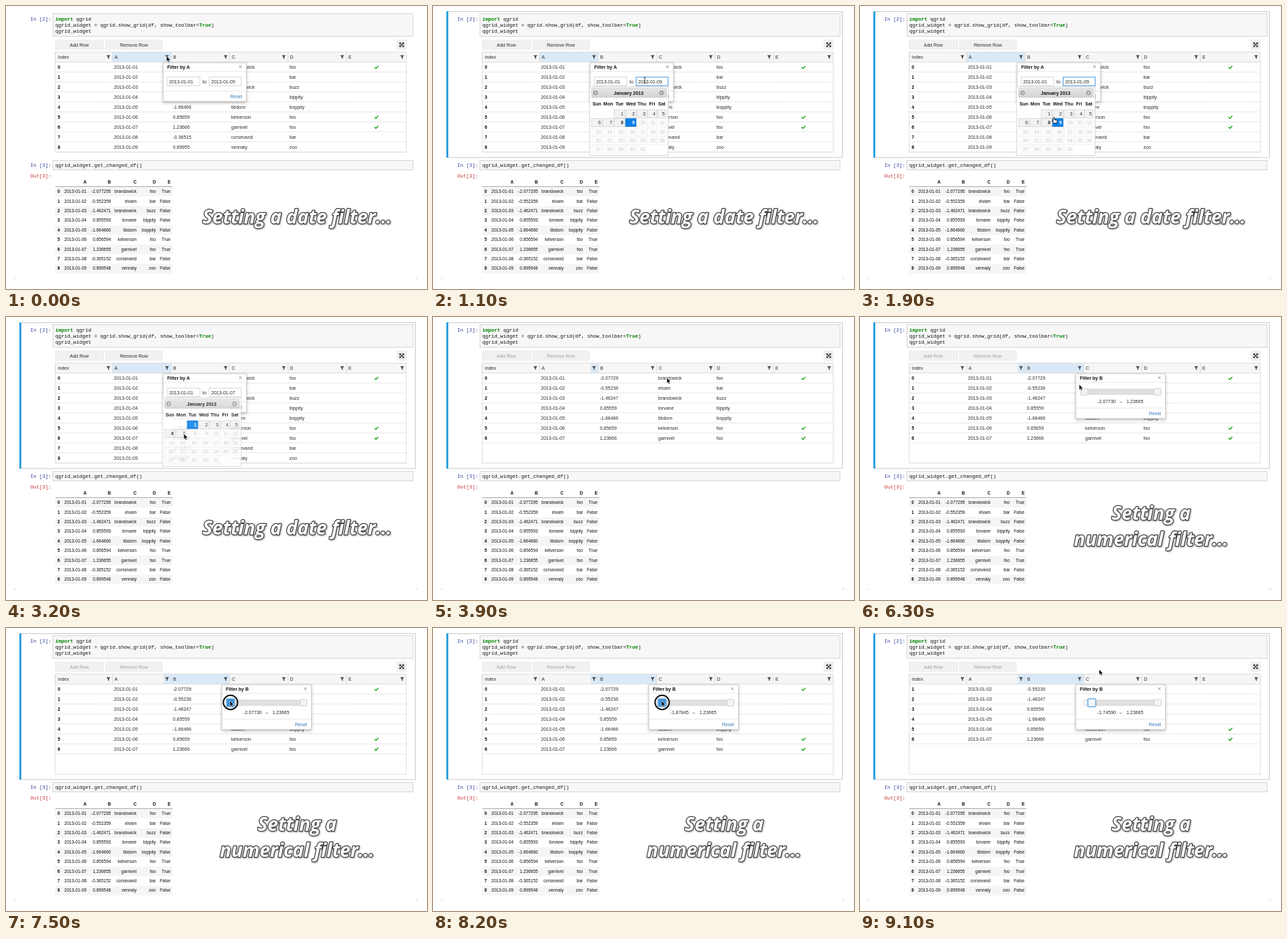
Animation of 632x424 px, one loop 9200 ms. Source, as an HTML page:

```html
<!DOCTYPE html>
<html lang="en">
<head>
<meta charset="utf-8">
<title>Grid filters</title>
<style>
html, body { margin: 0; width: 100%; height: 100%; overflow: hidden; background: #fff; }
svg { display: block; width: 632px; height: 424px; }
text { font: 7px "Liberation Sans", Arial, sans-serif; fill: #2b2b2b; white-space: pre; }
.b { font-weight: bold; fill: #111; }
.mono { font: 7.5px "Liberation Mono", "Courier New", monospace; fill: #111; }
.kw { font-weight: bold; fill: #008000; }
.in { fill: #303f9f; }
.res { fill: #c83232; }
.out text { font-size: 6.55px; fill: #111; }
.end { text-anchor: end; }
.mid { text-anchor: middle; }
.link { fill: #337ab7; }
.off { fill: #c4c4c4; }
.line { fill: none; stroke: #dcdcdc; }
.field { fill: #fff; stroke: #ccc; stroke-width: .8; }
.focus { fill: none; stroke: #66a9e6; stroke-width: 1.2; }
.pop { fill: #fff; stroke: #c4c4c4; stroke-width: .8; filter: drop-shadow(0 2px 2px rgba(0,0,0,.25)); }
.hl { fill: #d9e9f7; }
.cap { font: italic 700 28.2px "Open Sans", "Noto Sans", sans-serif; text-anchor: middle; fill: #fff;
  stroke: #3c3c3c; stroke-width: 2.4px; stroke-linejoin: round; paint-order: stroke;
  filter: drop-shadow(1.2px 1.2px .8px rgba(0,0,0,.35)); }

/* Things that come and go */
[class^="t-"] { animation: 9.2s step-end infinite; }
.t-sel, .t-pickTo, .t-pickFrom, .t-newDate, .t-mark, .t-popB, .t-hand, .t-beam, .t-ring,
.t-press, .t-focus, .t-val2, .t-val3, .t-cap2 { opacity: 0; }
.t-sel { animation-name: sel; }
.t-pickTo { animation-name: pickTo; }
.t-pickFrom { animation-name: pickFrom; animation-timing-function: linear; }
.t-oldDate { animation-name: oldDate; }
.t-newDate { animation-name: newDate; }
.t-late { animation-name: late; }
.t-low { animation-name: low; }
.t-rows { animation-name: rows; }
.t-dim text { animation: dim 9.2s step-end infinite; }
.t-popA { animation-name: popA; }
.t-mark { animation-name: mark; }
.t-popB { animation-name: popB; }
.t-arrow { animation-name: arrow; }
.t-beam { animation-name: beam; }
.t-hand { animation-name: hand; }
.t-ring { animation-name: ring; }
.t-press { animation-name: press; }
.t-focus { animation-name: focus; }
.t-val1 { animation-name: val1; }
.t-val2 { animation-name: val2; }
.t-val3 { animation-name: val3; }
.t-cap1 { animation-name: cap1; animation-timing-function: linear; }
.t-cap2 { animation-name: cap2; animation-timing-function: linear; }
.t-cursor { animation-name: cursor; animation-timing-function: ease-in-out; }
.t-slide { animation-name: slide; animation-timing-function: ease-in-out; }

@keyframes sel { 11.85%, to { opacity: 1; } }
@keyframes pickTo { 11.85% { opacity: 1; } 33.59% { opacity: 0; } }
@keyframes pickFrom { 0%, 33.58% { opacity: 0; } 33.59%, 34.5% { opacity: 1; } 36.85%, to { opacity: 0; } }
@keyframes oldDate { 33.59%, to { opacity: 0; } }
@keyframes newDate { 33.59%, to { opacity: 1; } }
@keyframes late { 36.85%, to { opacity: 0; } }
@keyframes low { 91.2%, to { opacity: 0; } }
@keyframes rows { 91.2%, to { transform: translateY(-14.95px); } }
@keyframes dim { 36.85%, to { fill: #a0a0a0; } }
@keyframes popA { 41.2%, to { opacity: 0; } }
@keyframes mark { 41.2%, to { opacity: 1; } }
@keyframes popB { 61.85%, to { opacity: 1; } }
@keyframes arrow { 7.5% { opacity: 0; } 33.59%, to { opacity: 1; } }
@keyframes beam { 7.5% { opacity: 1; } 15% { opacity: 0; } }
@keyframes hand { 15% { opacity: 1; } 33.59% { opacity: 0; } }
@keyframes ring { 79.2% { opacity: 1; } 95.5% { opacity: 0; } }
@keyframes press { 79.2% { opacity: 1; } 95.5% { opacity: 0; } }
@keyframes focus { 79.2%, to { opacity: 1; } }
@keyframes val1 { 89%, to { opacity: 0; } }
@keyframes val2 { 89% { opacity: 1; } 92.2% { opacity: 0; } }
@keyframes val3 { 92.2%, to { opacity: 1; } }
@keyframes cap1 { 0%, 36.9% { opacity: 1; } 40.2%, to { opacity: 0; } }
@keyframes cap2 { 0%, 42.9% { opacity: 0; } 46.2%, to { opacity: 1; } }
@keyframes cursor {
  0%, 1.09% { transform: translate(241px, 75px); }
  9.78%, 13.04% { transform: translate(318px, 111px); }
  19.57%, 22.83% { transform: translate(291px, 167px); }
  29.35%, 36.96% { transform: translate(267px, 175px); }
  40.76%, 43.48% { transform: translate(351px, 91px); }
  48.91%, 52.17% { transform: translate(306px, 73px); }
  54.35%, 65.22% { transform: translate(329px, 75px); }
  67.93%, 72.83% { transform: translate(329px, 101px); }
  77.17%, 83.59% { transform: translate(336px, 109px); }
  86.96%, 89.13% { transform: translate(343px, 109px); }
  93.48%, 98.8% { transform: translate(347px, 109px); }
  98.81%, to { transform: translate(359px, 62px); }
}
@keyframes slide {
  0%, 83.59% { transform: none; }
  86.96%, 89.13% { transform: translateX(7px); }
  93.48%, to { transform: translateX(11px); }
}
</style>
</head>
<body>
<svg viewBox="0 0 632 424">
  <defs>
    <clipPath id="body"><rect x="74" y="84" width="527" height="135"/></clipPath>
    <clipPath id="track"><rect x="336" y="108" width="111" height="8"/></clipPath>
    <linearGradient id="bar" x2="0" y2="1"><stop stop-color="#e6e6e6"/><stop offset="1" stop-color="#d2d2d2"/></linearGradient>
    <path id="funnel" d="M-2.9-2.8h5.8l-2.1 2.7v3.1l-1.6-1.2v-1.9z" fill="#444"/>
  </defs>
  <rect width="632" height="424" fill="#fff"/>
  <path d="M12.5 406v2.5h2M614 408.5h2.5V406" class="line"/>

  <g class="t-sel">
    <rect x="20.5" y="8.5" width="594" height="218.5" fill="#fff" stroke="#c8c8c8"/>
    <rect x="20" y="8" width="3" height="219" fill="#2e9fdc"/>
  </g>

  <g fill="#f7f7f7" stroke="#d4d4d4">
    <rect x="70.5" y="11.5" width="540.5" height="34"/>
    <rect x="70.5" y="231.5" width="540.5" height="14"/>
  </g>
  <text class="mono in end" x="68" y="21.5">In [2]:</text>
  <text class="mono" x="74" y="21.5"><tspan class="kw">import</tspan> qgrid</text>
  <text class="mono" x="74" y="31">qgrid_widget = qgrid.show_grid(df, show_toolbar=<tspan class="kw">True</tspan>)</text>
  <text class="mono" x="74" y="40">qgrid_widget</text>
  <text class="mono in end" x="68" y="241.2">In [3]:</text>
  <text class="mono" x="74" y="241.2">qgrid_widget.get_changed_df()</text>
  <text class="mono res end" x="68" y="256.5">Out[3]:</text>

  <g fill="#f1f1f1" stroke="#e4e4e4" stroke-width=".7">
    <rect x="74" y="51" width="72.5" height="14"/>
    <rect x="149.5" y="51" width="85" height="14"/>
    <rect x="587" y="51" width="14" height="14"/>
  </g>
  <g class="t-dim">
    <text class="mid" x="110" y="60.5">Add Row</text>
    <text class="mid" x="192" y="60.5">Remove Row</text>
  </g>
  <path transform="translate(594 58)" d="M-2.6-2.6l5.2 5.2M2.6-2.6l-5.2 5.2M-3-.8V-3h2.2M.8-3H3v2.2M3 .8V3H.8M-.8 3H-3V.8" fill="none" stroke="#333" stroke-width="1.1"/>

  <g id="head"></g>
  <g clip-path="url(#body)"><g id="rows" class="t-rows"></g></g>
  <rect class="line" x="74" y="69" width="527" height="150"/>
  <g id="result" class="out"></g>

  <g class="t-cap1"><text class="cap" x="437" y="326">Setting a date filter...</text></g>
  <g class="t-cap2">
    <text class="cap" x="437" y="304">Setting a</text>
    <text class="cap" x="437" y="342.5">numerical filter...</text>
  </g>

  <g class="t-popA">
    <rect class="pop" x="236" y="85" width="125" height="58"/>
    <path class="line" d="M236.5 98h124M236.5 127.5h124" stroke-width=".7"/>
    <text class="b" x="242" y="93.6">Filter by A</text>
    <text class="mid" x="352" y="94.3" style="fill:#888;font-size:9px">×</text>
    <rect class="field" x="242" y="106.5" width="49" height="13"/>
    <rect class="field" x="305" y="106.5" width="48" height="13"/>
    <text x="245" y="115.6">2013-01-01</text>
    <text class="mid" x="298" y="115.6">to</text>
    <g class="t-oldDate"><text x="308" y="115.6">2013-01-09</text></g>
    <g class="t-newDate"><text x="308" y="115.6">2013-01-07</text></g>
    <text class="link end" x="354.5" y="138.2">Reset</text>
    <g class="t-pickTo"><rect class="focus" x="305" y="106.5" width="48" height="13"/></g>
    <g id="to" class="t-pickTo"></g>
    <g id="from" class="t-pickFrom"></g>
  </g>

  <g class="t-popB">
    <rect class="pop" x="324" y="85" width="134.5" height="67"/>
    <path class="line" d="M324.5 98h133.5M324.5 136.5h133.5" stroke-width=".7"/>
    <text class="b" x="330" y="93.6">Filter by B</text>
    <text class="mid" x="449.5" y="94.3" style="fill:#888;font-size:9px">×</text>
    <g clip-path="url(#track)">
      <rect x="336" y="108" width="111" height="8" fill="#f8f8f8"/>
      <rect class="t-slide" x="336" y="108" width="120" height="8" fill="#e0e0e0"/>
    </g>
    <rect x="336" y="108" width="111" height="8" rx="1.5" fill="none" stroke="#cfcfcf" stroke-width=".8"/>
    <rect x="441.5" y="107" width="10.5" height="10" rx="1.5" fill="#f3f3f3" stroke="#c4c4c4" stroke-width=".8"/>
    <g class="t-slide">
      <rect x="331.5" y="107" width="10.5" height="10" rx="1.5" fill="#f3f3f3" stroke="#c4c4c4" stroke-width=".8"/>
      <g class="t-focus"><rect x="331" y="106" width="12" height="12" rx="1.5" fill="#eef4fa" stroke="#70aee2" stroke-width="1.6"/></g>
      <g class="t-press"><rect x="331.5" y="106.5" width="11" height="11" rx="1" fill="#3d94dd"/></g>
    </g>
    <g class="t-val1"><text class="end" x="384" y="128.5">-2.07730</text></g>
    <g class="t-val2"><text class="end" x="384" y="128.5">-1.87845</text></g>
    <g class="t-val3"><text class="end" x="384" y="128.5">-1.74590</text></g>
    <text class="mid" x="391.5" y="128.5">–</text>
    <text x="400" y="128.5">1.23665</text>
    <text class="link end" x="452" y="147.2">Reset</text>
  </g>

  <g class="t-cursor">
    <g class="t-ring"><circle cx="1" cy="2.5" r="10.7" fill="none" stroke="#111" stroke-width="2"/></g>
    <g class="t-arrow"><path d="M0 0v8.4l1.9-1.8 1.3 2.9 1.5-.7-1.3-2.8h2.6z" fill="#111" stroke="#fff" stroke-width=".5"/></g>
    <g class="t-beam"><path d="M-1.6-4h3.2M0-4v8M-1.6 4h3.2" fill="none" stroke="#222" stroke-width=".8"/></g>
    <g class="t-hand"><path d="M-1 .6q1-1.4 2 0v2.8l3.4.8q1 .4.8 1.5l-.7 2.9H0L-2.8 5q.2-1 1.8.4z" fill="#fff" stroke="#111" stroke-width=".9"/></g>
  </g>
</svg>
<script>
const $ = id => document.getElementById(id);
const text = (x, y, s, cls = '') => `<text x="${x}" y="${y}" class="${cls}">${s}</text>`;
const rect = (x, y, w, h, attrs) => `<rect x="${x}" y="${y}" width="${w}" height="${h}" ${attrs}/>`;
const funnel = x => `<use href="#funnel" x="${x}" y="76.5"/>`;

const names = 'brandowick elvam brandowick torvane tibdorn kelverson garnivel corsevand vennaly'.split(' ');
const words = 'foo bar buzz bippity boppity foo foo bar zoo'.split(' ');
const nums = '-2.077295 -0.552359 -1.462471 0.855593 -1.664660 0.856594 1.236655 -0.365152 0.899548'.split(' ');
const flags = [0, 5, 6];
const date = i => `2013-01-0${i + 1}`;

// Column heads
const cols = [74, 160, 248, 336, 423.3, 511, 601];
$('head').innerHTML = rect(74, 69, 527, 15, 'fill="#f6f6f6"') +
  `<g class="t-popA">${rect(160, 69, 88, 15, 'class="hl"')}</g>` +
  `<g class="t-mark">${rect(236.5, 69, 11.5, 15, 'class="hl"')}</g>` +
  `<g class="t-popB">${rect(248, 69, 88, 15, 'class="hl"')}</g>` +
  ['index', 'A', 'B', 'C', 'D', 'E'].map((s, i) =>
    text(cols[i] + (i ? 3 : 4), 79, s) + funnel(cols[i + 1] - 6.3) +
    `<path class="line" d="M${cols[i]} 69v15"/>`).join('') +
  '<path class="line" d="M74 84h527"/>';

// Grid rows
const step = 14.95;
$('rows').innerHTML = names.map((name, i) => {
  const y = 94.4 + i * step;
  const cls = i > 6 ? 't-late' : i ? '' : 't-low';
  const check = flags.includes(i)
    ? `<path d="M553.3 ${y - 2.7}l2 2 3.6-3.8" fill="none" stroke="#2cae2c" stroke-width="1.6"/>` : '';
  return `<g class="${cls}">` + text(77.5, y, i, 'b') + text(162, y, date(i)) +
    text(250.5, y, +(+nums[i]).toFixed(5)) + text(338, y, name) + text(425.5, y, words[i]) + check +
    `<path class="line" stroke-width=".7" d="M74 ${84 + (i + 1) * step}h527"/></g>`;
}).join('');

// Printed frame
const ends = [121, 157.5, 196, 225, 247];
$('result').innerHTML = [...'ABCDE'].map((s, i) => text(ends[i], 265.5, s, 'b end')).join('') +
  '<path d="M74 270.5h176" stroke="#999" stroke-width=".8"/>' +
  names.map((name, i) => {
    const y = 280.2 + i * 14.4;
    const cells = [date(i), nums[i], name, words[i], flags.includes(i) ? 'True' : 'False'];
    return (i % 2 ? '' : rect(74, y - 9.2, 176, 14.4, 'fill="#f5f5f5"')) +
      text(81, y, i, 'b end') + cells.map((s, k) => text(ends[k], y, s, 'end')).join('');
  }).join('');

// Month sheet: chosen day and last day allowed
const left = [238, 255, 272, 289, 306, 322, 337, 351];
function picker(chosen, last) {
  let s = rect(235, 121, 118, 103, 'fill="#fff" stroke="#c8c8c8" stroke-width=".8"') +
    rect(238, 123, 112.5, 14, 'rx="1.5" fill="url(#bar)" stroke="#c6c6c6" stroke-width=".6"');
  for (const [x, d] of [[244, 1], [343, -1]])
    s += `<circle cx="${x}" cy="130" r="3.5" fill="#a2a2a2"/><path d="M${x + d} 128.3l${-2 * d} 1.7 ${2 * d} 1.7" fill="#fff"/>`;
  s += text(293.7, 132.6, 'January 2013', 'b mid');
  'Sun Mon Tue Wed Thu Fri Sat'.split(' ').forEach((day, i) =>
    s += text((left[i] + left[i + 1] - 1) / 2, 148.6, day, 'b mid'));
  for (let d = 1; d <= 31; d++) {
    const col = (d + 1) % 7, y = 155.3 + Math.floor((d + 1) / 7) * 13.4;
    const x = left[col], w = left[col + 1] - x - 1;
    const on = d === chosen, off = d > last;
    const look = on ? 'fill="#0b80e6" stroke="#0a6fc8"'
      : off ? 'fill="#fcfcfc" stroke="#f0f0f0"' : 'fill="#f2f2f2" stroke="#cfcfcf"';
    s += rect(x, y, w, 12, look + ' stroke-width=".7"') +
      `<text x="${x + w - 2}" y="${y + 8.5}" class="end ${off ? 'off' : ''}"` +
      `${on ? ' style="fill:#fff;font-weight:bold"' : d === last - 1 ? ' style="font-weight:bold"' : ''}>${d}</text>`;
  }
  return s;
}
$('to').innerHTML = picker(9, 9);
$('from').innerHTML = picker(1, 7);
</script>
</body>
</html>
```
